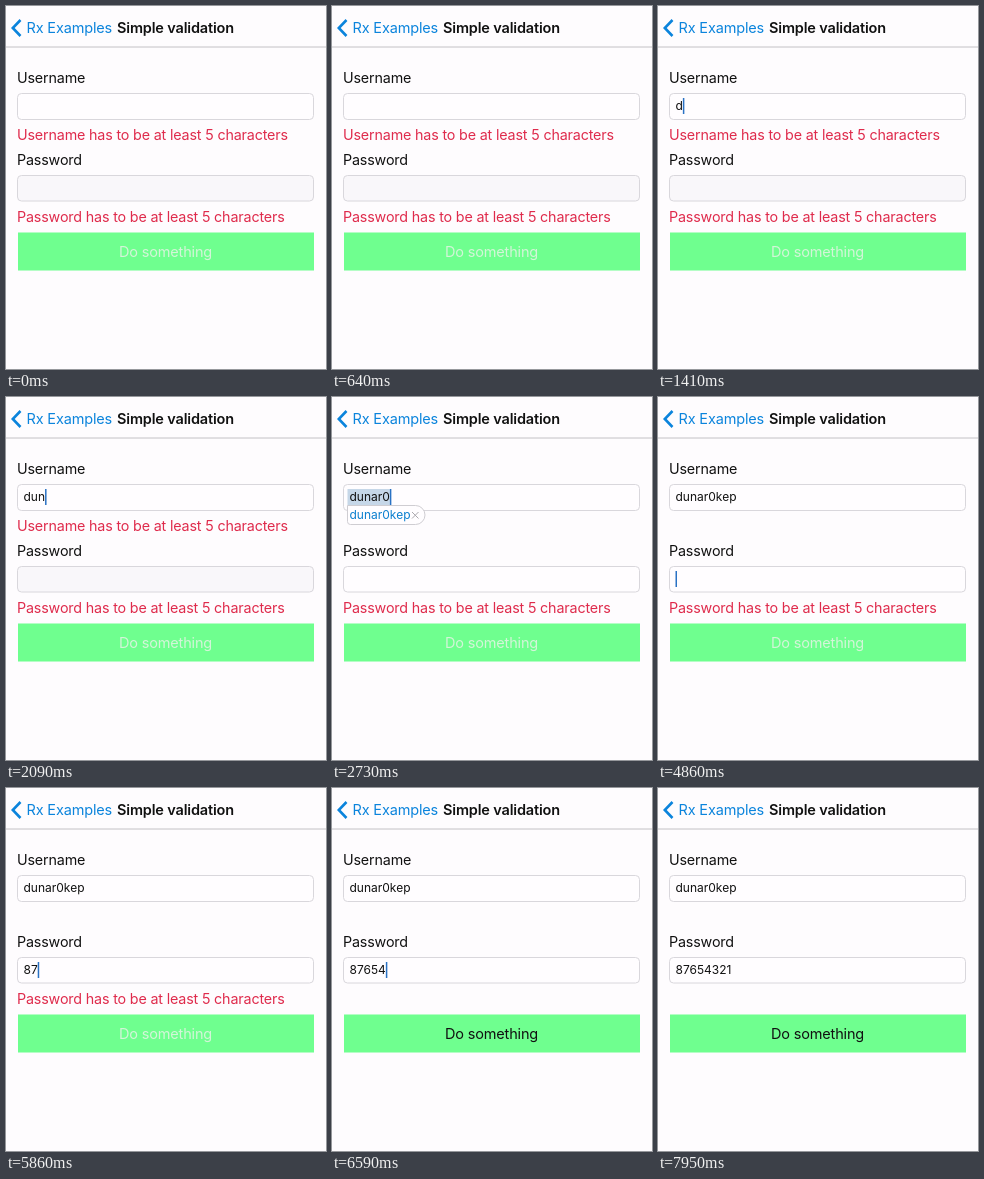
Write an HTML page that moves like this. It is 320 px wide and 363 px high and loops after 8000 ms.

```html
<!DOCTYPE html>
<html lang="en">
<head>
<meta charset="utf-8">
<title>Simple validation</title>
<style>
  html, body { margin: 0; width: 100%; height: 100%; overflow: hidden; background: #fefcfe; }
  svg { display: block; width: 100%; height: 100%; }
  text { font: 14.3px Inter, sans-serif; letter-spacing: -.16px; fill: #111; white-space: pre; }
  .nav text { font-size: 14.5px; }
  .nav .title { font-weight: 600; }
  .nav .back { fill: #0b84dc; }
  .error { fill: #df2b4c; }
  .field { fill: #fffdff; stroke: #d9d7dc; }
  .field.disabled { fill: #f9f7fa; }
  text.value { font-size: 12px; letter-spacing: 0; }
  .caret { fill: #2a72c4; }
  .selection { fill: #c6d7e8; }
  .bubble path { fill: #fffdff; stroke: #cfcdd2; }
  .bubble .value { fill: #0b7fcf; }
  .bubble .close { fill: none; stroke: #aaa8ad; }
  #label { font-size: 14.5px; }
  #label.disabled { fill: #d3f5d8; }
</style>
</head>
<body>
<svg viewBox="0 0 320 363">
  <g class="nav">
    <path d="M0 41H320" stroke="#c3c1c5"/>
    <path d="M14.5 14L6.8 22L14.5 30" fill="none" stroke="#0b84dc" stroke-width="2.6"/>
    <text class="back" x="20.5" y="27">Rx Examples</text>
    <text class="title" x="169.5" y="27" text-anchor="middle">Simple validation</text>
  </g>

  <text x="11" y="77">Username</text>
  <rect class="field" x="11.5" y="87.5" width="296" height="26" rx="4"/>
  <rect class="selection" id="selection" x="15.5" y="92" height="16.5"/>
  <text class="value" id="userText" x="17.5" y="104.4"></text>
  <text class="error" id="userError" x="11" y="134">Username has to be at least 5 characters</text>

  <text x="11" y="159">Password</text>
  <rect class="field" id="passField" x="11.5" y="169.5" width="296" height="25.5" rx="4"/>
  <text class="value" id="passText" x="17.5" y="186.4"></text>
  <text class="error" id="passError" x="11" y="216">Password has to be at least 5 characters</text>

  <g class="bubble" id="bubble">
    <path d="M15.5 108.5H83.5A9.5 9.5 0 0 1 83.5 127.5H18.5Q15.5 127.5 15.5 124.5Z"/>
    <text class="value" id="suggestion" x="17.5" y="122.4"></text>
    <path class="close" d="M80 115L86.5 121.5M86.5 115L80 121.5"/>
  </g>

  <rect x="12" y="226.5" width="296" height="38" fill="#6fff8f"/>
  <text id="label" x="159.5" y="251" text-anchor="middle">Do something</text>
  <rect class="caret" id="caret" width="1.5" height="16"/>
</svg>
<script>
const LOOP = 8000, MIN_LENGTH = 5;
const user = { text: 'dunar0kep', focus: 950, keys: [1350, 1680, 1900, 2120, 2350, 2580, 2850, 2990, 3130] };
const pass = { text: '87654321', focus: 3500, keys: [5560, 5780, 6040, 6280, 6500, 6780, 7020, 7250] };
const $ = id => document.getElementById(id);
const show = (id, on) => $(id).style.display = on ? '' : 'none';

const typed = (input, t) => input.text.slice(0, input.keys.filter(k => k <= t).length);
const lastAction = (input, t) => Math.max(...[input.focus, ...input.keys].filter(k => k <= t));

function render(t) {
  const userValue = typed(user, t), passValue = typed(pass, t);
  const userValid = userValue.length >= MIN_LENGTH;
  const passValid = passValue.length >= MIN_LENGTH;
  $('userText').textContent = userValue;
  $('passText').textContent = passValue;
  show('userError', !userValid);
  show('passError', !passValid);
  $('passField').classList.toggle('disabled', !userValid);
  $('label').classList.toggle('disabled', !(userValid && passValid));

  const onPassword = t >= pass.focus;
  const active = onPassword ? pass : user;
  const line = $(onPassword ? 'passText' : 'userText');
  const end = 17.5 + (line.textContent ? line.getComputedTextLength() : 0);

  const suggesting = userValue.length > MIN_LENGTH && userValue.length < user.text.length;
  show('bubble', suggesting);
  show('selection', suggesting);
  if (suggesting) $('selection').setAttribute('width', end - 15.5);

  const blinkOn = t >= active.focus && (t - lastAction(active, t)) % 1000 < 550;
  show('caret', blinkOn);
  $('caret').setAttribute('x', end);
  $('caret').setAttribute('y', onPassword ? 174 : 92);
}

$('suggestion').textContent = user.text;
const start = performance.now();
function tick() {
  render((performance.now() - start) % LOOP);
  requestAnimationFrame(tick);
}
tick();
</script>
</body>
</html>
```
